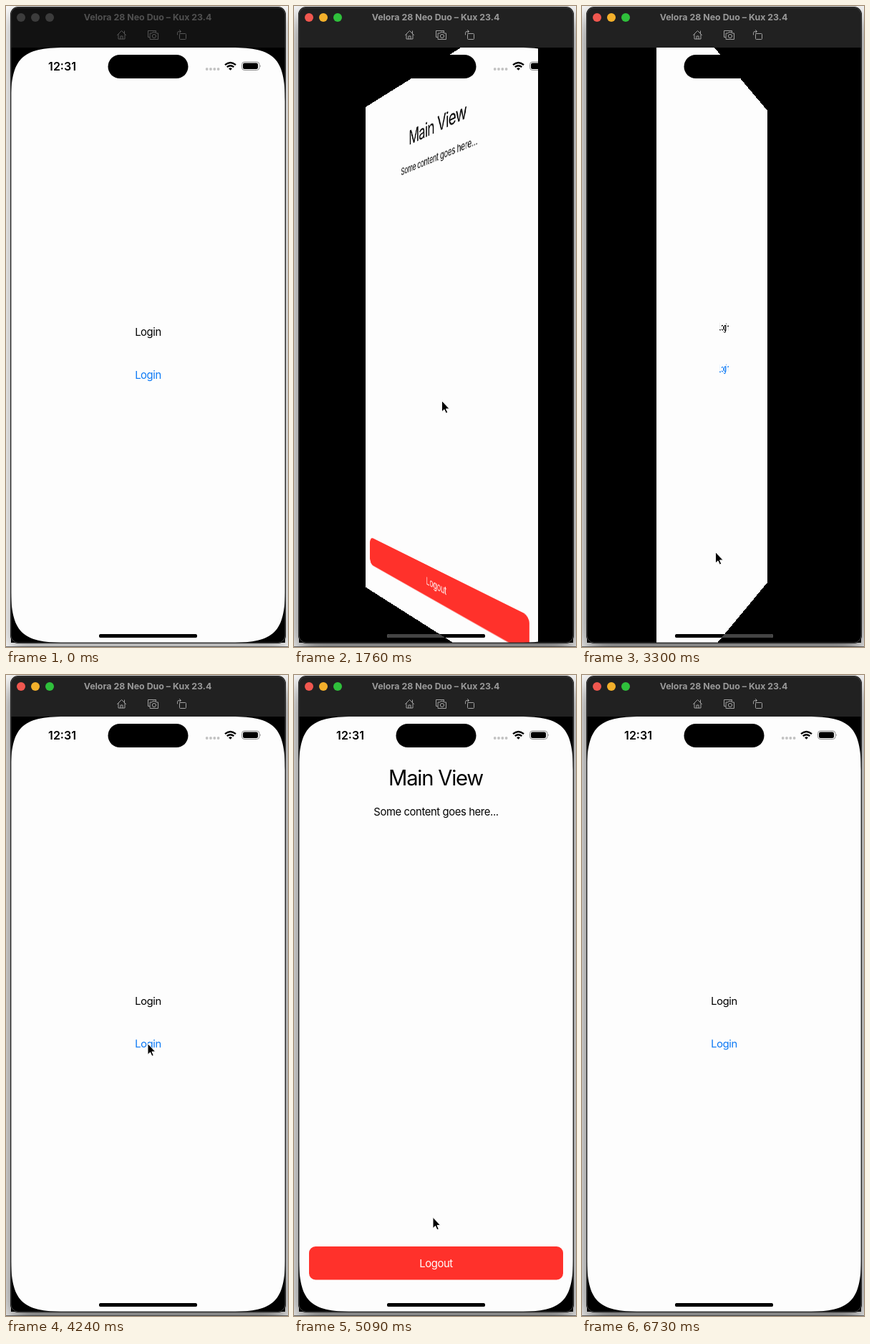
These frames come from a looping animation (394 px wide and 894 px high, 6.76 s). An HTML page:

```html
<!DOCTYPE html>
<html lang="en">
<head>
<meta charset="utf-8">
<title>Flip transition</title>
<style>
  html, body { margin: 0; width: 100%; height: 100%; overflow: hidden; background: #fff; }
  body { position: relative; font-family: Inter, "Liberation Sans", sans-serif; }
  svg, div { position: absolute; display: block; }
  text { text-anchor: middle; white-space: pre; }
  #win { left: 6px; top: 1px; width: 385px; height: 888px; border-radius: 11px;
         background: #000; box-shadow: 0 8px 24px rgba(0, 0, 0, .4); }
  #edge { left: 0; top: 892.5px; width: 394px; height: 2px; background: #777; }
  #screen { left: 7px; top: 58px; width: 383px; height: 830px; overflow: hidden; background: #000;
            border-radius: 0 0 10px 10px; }
  .page { left: 0; top: 0; width: 383px; height: 830px; background: #fdfdfd; will-change: transform; }
  .body { font-size: 14.8px; letter-spacing: -.38px; }
  .heading { font-size: 29.2px; letter-spacing: -1.2px; }
  /* Black over the page, dark grey over the empty backdrop. */
  .home { left: 123px; top: 818px; width: 137px; height: 5px; border-radius: 3px; }
  #invert { background: #fdfdfd; mix-blend-mode: difference; }
  #dim { background: #444; mix-blend-mode: multiply; }
  #top { left: 0; top: 0; }
  #bar { fill: #121212; }
  #title { fill: #505050; font-size: 12.4px; font-weight: 700; }
  #tools { fill: none; stroke: #555; stroke-width: 1; stroke-linejoin: round; stroke-linecap: round; }
  #lights { fill: #3c3c3c; }
  .focus #win { box-shadow: 0 12px 32px rgba(0, 0, 0, .65); }
  .focus #bar { fill: #212121; }
  .focus #title { fill: #999; }
  .focus #tools { stroke: #a2a2a2; }
  .focus #lights :nth-child(1) { fill: #f0574f; }
  .focus #lights :nth-child(2) { fill: #f3b02b; }
  .focus #lights :nth-child(3) { fill: #2fc03b; }
</style>
</head>
<body>
<div id="edge"></div>
<div id="win"></div>
<div id="screen">
  <svg class="page" id="login" viewBox="7 58 383 830">
    <g class="body" id="loginText">
      <text x="198.5" y="460">Login</text>
      <text x="198.5" y="519.5" fill="#0a78f5">Login</text>
    </g>
  </svg>
  <svg class="page" id="main" viewBox="7 58 383 830">
    <g class="body" id="mainText">
      <text class="heading" x="198" y="154">Main View</text>
      <text x="198.5" y="195.5">Some content goes here...</text>
    </g>
    <rect x="21" y="797" width="355" height="46.5" rx="9" fill="#ff312b"/>
    <text class="body" x="198.5" y="826" fill="#fff">Logout</text>
  </svg>
  <div class="home" id="invert"></div>
  <div class="home" id="dim"></div>
</div>
<svg id="top" width="394" height="894" viewBox="0 0 394 894">
  <defs>
    <path id="corner" d="M0 0H75C15 0 0 15 0 75Z"/>
  </defs>
  <use href="#corner" transform="translate(7 58)"/>
  <use href="#corner" transform="translate(390 58) scale(-1 1)"/>
  <use href="#corner" transform="translate(7 888) scale(1 -1)"/>
  <use href="#corner" transform="translate(390 888) scale(-1 -1)"/>
  <path id="bar" d="M7 58V12Q7 2 17 2H380Q390 2 390 12V58Z"/>
  <text id="title" x="198" y="20">Velora 28 Neo Duo – Kux 23.4</text>
  <g id="lights">
    <circle cx="21" cy="16" r="6"/><circle cx="41" cy="16" r="6"/><circle cx="61" cy="16" r="6"/>
  </g>
  <g id="tools">
    <path d="M155.5 40.5L161.5 34.5L167.5 40.5M157 39.5V46H166V39.5M160 46V42H163V46M165.5 38V35"/>
    <path d="M200.5 43.5H198.5V34.5H209.5V36.5M201.5 38H204L205 36.5H208.5L209.5 38H212.5V46.5H201.5Z"/>
    <circle cx="207" cy="42" r="2.6"/>
    <rect x="242.5" y="38.5" width="9" height="8" rx="1"/>
    <path d="M239.5 40V37.5Q239.5 35.5 242 35.5H244M242.5 33.5L244.5 35.5L242.5 37.5"/>
  </g>
  <rect x="142.5" y="68" width="112" height="33" rx="16.5"/>
  <text x="78.5" y="90" font-size="16" font-weight="600">12:31</text>
  <g opacity=".23">
    <circle cx="280.7" cy="88" r="1.9"/><circle cx="286" cy="88" r="1.9"/>
    <circle cx="291.3" cy="88" r="1.9"/><circle cx="296.6" cy="88" r="1.9"/>
  </g>
  <path d="M306 82.2Q313.5 75.8 321 82.2M308.7 85.2Q313.5 81.2 318.3 85.2" fill="none" stroke="#000" stroke-width="2.3"/>
  <path d="M311 87.3Q313.5 85.3 316 87.3L313.5 89.7Z"/>
  <g opacity=".45">
    <rect x="329.5" y="78" width="24.5" height="11.5" rx="3.6" fill="none" stroke="#000"/>
    <path d="M355.2 82Q357 83.7 355.2 85.5Z"/>
  </g>
  <rect x="331" y="79.5" width="21" height="8.5" rx="2.2"/>
  <rect x="7" y="2" width="383" height="886" rx="10" fill="none" stroke="#4b4b4b" stroke-width=".9"/>
  <path id="cursor" d="M0 0V15.5L3.5 12.3L5.9 17.6L8.3 16.5L6 11.4H10.8Z" stroke="#fff"/>
</svg>
<script>
const LOOP = 6760, FLIP = 500, FOCUS_AT = 330;
const $ = id => document.getElementById(id);
const pages = [$('login'), $('main')];
const texts = [$('loginText'), $('mainText')];
const textShift = [-10.5, 5.5];         // layout offset while a page flips in
const flips = [1438.6, 3009, 4335, 5679]; // alternately to main and to login
const path = [                          // pointer: time, x, y
  [500, 190, 894], [1200, 198, 514], [1600, 198, 514], [1760, 206.5, 550],
  [2300, 196, 815], [3020, 194, 815], [3300, 186.5, 762], [3850, 198, 514],
  [4450, 198, 514], [5090, 194, 756], [5350, 195, 815], [5700, 195, 815], [5900, 205, 900]
];

function drawPages(t) {
  let shown = 0, angle = 0, shift = 0;
  flips.forEach((start, i) => {
    if (t < start) return;
    const to = 1 - i % 2, dir = to ? 1 : -1;
    const p = Math.min(1, (t - start) / FLIP);
    const turn = 90 - 90 * Math.cos(Math.PI * p);
    const incoming = p >= .5;
    shown = incoming ? to : 1 - to;
    angle = dir * (incoming ? turn - 180 : turn);
    shift = incoming && p < 1 ? textShift[to] : 0;
  });
  // The page recedes and sinks a little halfway through each quarter turn.
  const sway = Math.abs(Math.sin(angle * Math.PI / 90));
  pages.forEach((page, i) => page.style.visibility = i === shown ? 'visible' : 'hidden');
  pages[shown].style.transform = angle
    ? `scale(${1 - .045 * sway}) perspective(800px) rotateY(${angle}deg) translateY(${3.5 * sway}px)` : 'none';
  texts[shown].setAttribute('transform', `translate(0 ${shift})`);
}

function drawCursor(t) {
  const i = path.findIndex(k => k[0] > t);
  $('cursor').style.display = i > 0 ? '' : 'none';
  if (i < 1) return;
  const [t0, x0, y0] = path[i - 1], [t1, x1, y1] = path[i];
  const p = (t - t0) / (t1 - t0);
  $('cursor').setAttribute('transform', `translate(${x0 + (x1 - x0) * p} ${y0 + (y1 - y0) * p})`);
}

const begin = performance.now();
function frame() {
  const t = (performance.now() - begin) % LOOP;
  document.body.classList.toggle('focus', t >= FOCUS_AT);
  drawPages(t);
  drawCursor(t);
  requestAnimationFrame(frame);
}
frame();
</script>
</body>
</html>
```
